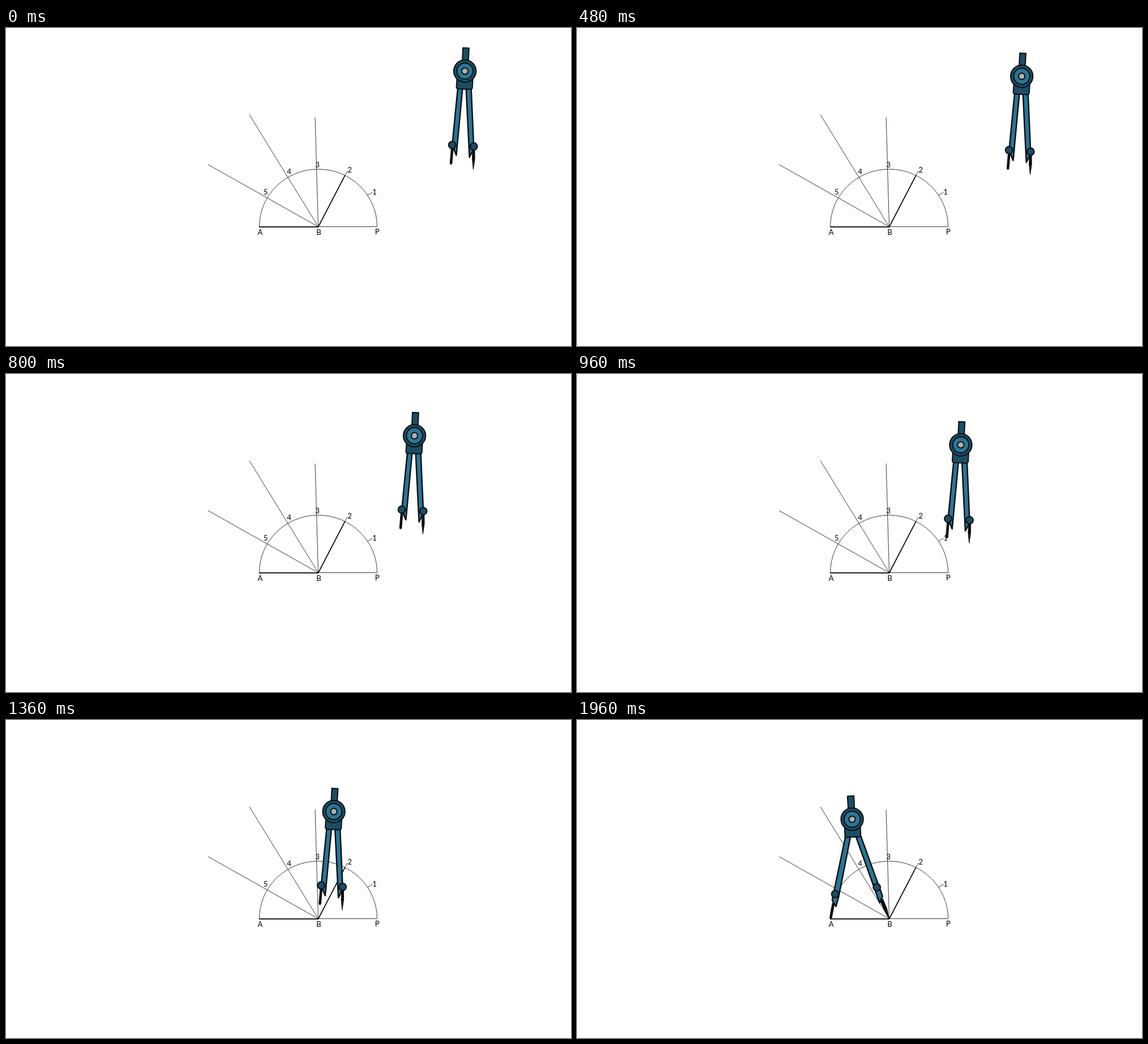
An HTML page for the animation above (2 s loop, 998 px wide and 561 px high).

```html
<!DOCTYPE html>
<html lang="en">
<head>
<meta charset="utf-8">
<title>Compass construction</title>
<style>
  html, body { margin: 0; width: 100%; height: 100%; overflow: hidden; background: #fff; }
  svg { display: block; width: 998px; height: 561px; }
  text { font: 13.2px Lato, Carlito, sans-serif; text-anchor: middle; }
  .thin { fill: none; stroke: #222; stroke-width: .9; }
  .bold { stroke: #000; stroke-width: 1.7; stroke-linecap: round; }
  .dark, .blue, .pin { stroke: #0a0d10; stroke-width: 2; stroke-linejoin: round; }
  .dark { fill: #1d4d64; }
  .blue { fill: #2a7594; }
  .leg { stroke-width: 2.4; }
  .pin { fill: #b3afab; }
  .lead { stroke: #0c0c0c; stroke-width: 4.6; stroke-linecap: round; }
  .needle { fill: #0c0c0c; stroke: #0c0c0c; stroke-width: 1; stroke-linejoin: round; }
</style>
</head>
<body>
<svg viewBox="0 0 998 561">
  <path class="thin" d="M447.5 350.5A104 101.5 0 0 1 655.5 350.5M551.5 350.5H655.5"/>
  <path class="thin" d="M357 241L551.5 350.5L430 153M551.5 350.5L546 158"/>
  <path class="thin" d="M598.5 260.5L603 252M638.5 295L647.5 290"/>
  <path class="bold" d="M447.5 350.8H551.5L598.3 260.8" fill="none"/>
  <g id="labels"></g>
  <g id="closed">
    <path class="lead" d="M-22.5 138L-24.5 162.5"/>
    <path class="needle" d="M13.5 138L17.3 138L17.5 155L14.8 173.5L13 155Z"/>
    <path class="blue leg" d="M-12.5 29L-4 29L-15.2 148.5L-22.5 131Z"/>
    <path class="blue leg" d="M2 29L11 29L15.8 137L8 152Z"/>
    <circle class="dark" cx="-22.5" cy="130.3" r="6.4"/>
    <circle class="dark" cx="15.6" cy="133" r="6.4"/>
    <path class="dark" d="M-3.5 -41L7.3 -40.5L6 -16L-4.7 -16Z"/>
    <path class="dark" d="M-14 12L-15 28Q-15 31 -12 31.2L10 32.2Q13 32.2 13.2 29L14 13Z"/>
    <g class="hub"></g>
  </g>
  <g id="open" transform="translate(486 175)">
    <path class="lead" d="M-32.5 147L-37.8 173.5"/>
    <path class="needle" d="M50 145L54 140L61.5 158L65.3 176L57.5 162Z"/>
    <path class="blue leg" d="M-11.5 29L-2.5 29L-24 138L-28.5 154L-35.3 142.5Z"/>
    <path class="blue leg" d="M6 29L15 29L53.8 136L48.5 147.5Z"/>
    <circle class="dark" cx="-30" cy="132" r="6.4"/>
    <circle class="dark" cx="43.6" cy="120" r="6.4"/>
    <path class="dark" d="M-8.3 -40.5L3 -41.2L4.3 -16L-6.8 -16Z"/>
    <path class="dark" d="M-13.5 13L-12.5 32L15.2 31L14.5 12Z"/>
    <g class="hub"></g>
  </g>
</svg>
<script>
  const LOOP = 2000, STEP = 40, OPEN_AT = 1880;
  const START = 120, END = 1835, RAMP = 711;
  const find = id => document.getElementById(id);
  const closed = find('closed'), open = find('open');

  const labels = [['A', 449, 364.7], ['B', 552.5, 364.7], ['P', 655.7, 364.2],
    [1, 651, 293.7], [2, 607, 254.8], [3, 550, 245.5], [4, 500, 258], [5, 458.5, 293.7]];
  find('labels').innerHTML = labels
    .map(([s, x, y]) => `<text x="${x}" y="${y}">${s}</text>`).join('');

  for (const hub of document.querySelectorAll('.hub')) {
    hub.innerHTML = [['dark', 19.7], ['blue', 14.3], ['pin', 5.6]]
      .map(([c, r]) => `<circle class="${c}" r="${r}"/>`).join('');
  }

  // Constant acceleration, steady glide, constant braking.
  function glide(t) {
    const span = END - START;
    const p = Math.min(Math.max(t - START, 0), span);
    const v = 1 / (span - RAMP);
    if (p < RAMP) return v * p * p / (2 * RAMP);
    if (p > span - RAMP) return 1 - v * (span - p) ** 2 / (2 * RAMP);
    return v * (p - RAMP / 2);
  }

  function draw(now) {
    const t = Math.floor(now % LOOP / STEP) * STEP;
    const k = glide(t), opened = t >= OPEN_AT;
    closed.setAttribute('transform', `translate(${810.6 - 275 * k} ${76 + 101.5 * k})`);
    closed.style.display = opened ? 'none' : '';
    open.style.display = opened ? '' : 'none';
  }

  const begin = performance.now();
  function tick() {
    draw(performance.now() - begin);
    requestAnimationFrame(tick);
  }
  tick();
</script>
</body>
</html>
```
